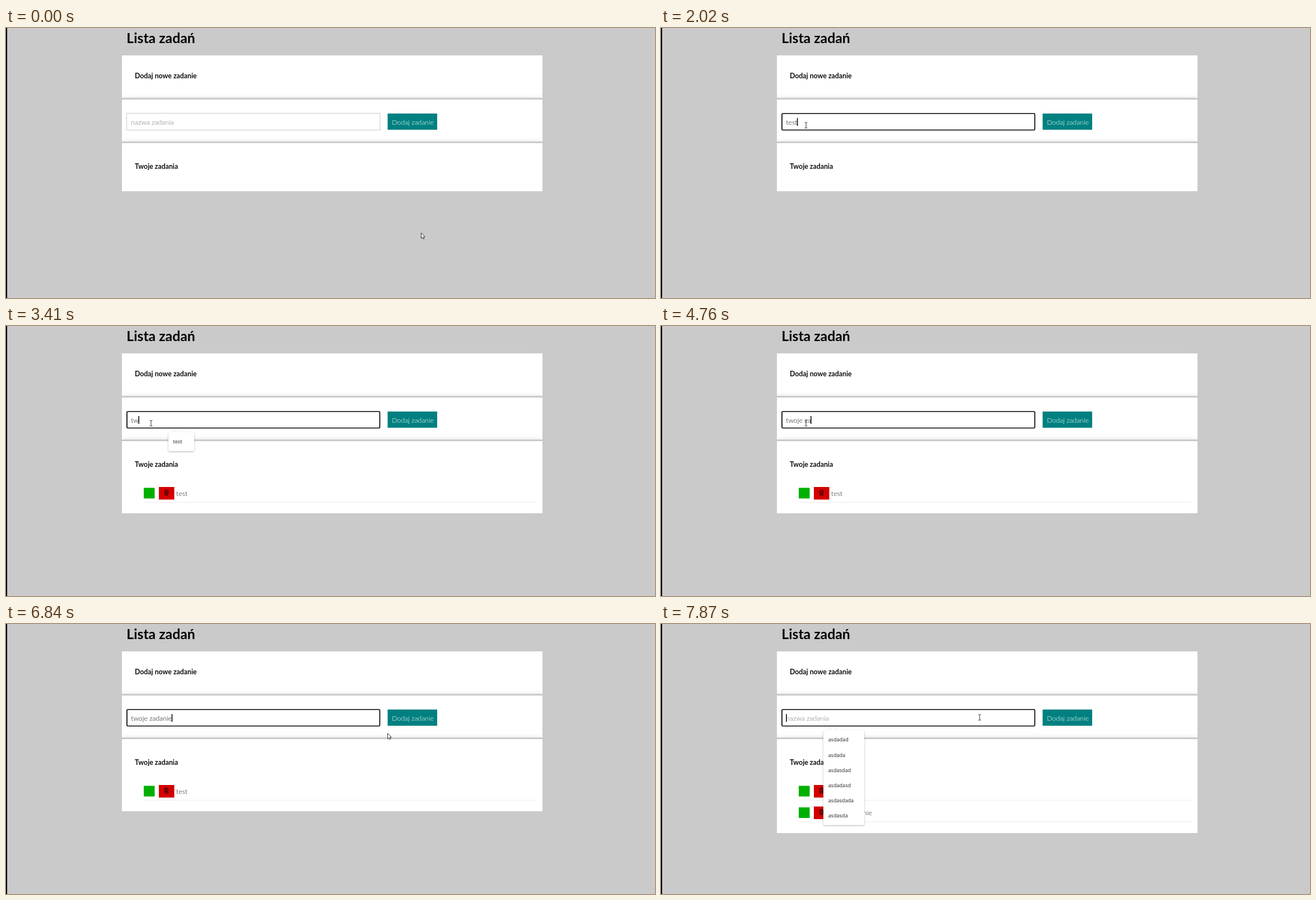
Recreate the animation shown at these times as an HTML page. Size 1159 by 483 pixels, loop 8 s.

```html
<!DOCTYPE html>
<html lang="pl">
<head>
<meta charset="utf-8">
<title>Lista zadań</title>
<style>
  html, body { margin: 0; width: 100%; height: 100%; overflow: hidden; background: #cacaca; }
  svg { position: absolute; inset: 0; width: 1159px; height: 483px; font: 300 12.3px Lato, sans-serif; }
  text { white-space: pre; }
  .bar { position: absolute; left: 0; top: 0; width: 2px; height: 483px; background: #000; }
  .card { position: absolute; left: 206.5px; width: 751.5px; background: #fff; box-shadow: 0 0 11px #cacaca; }
  h1, h2 { margin: 0; }
  .title { font-weight: 700; font-size: 24.8px; }
  .heading { font-weight: 700; fill: #111; }
  .popup { filter: drop-shadow(0 1px 1.5px rgba(0, 0, 0, .3)); }
  .popup text { font: 400 9.1px "Open Sans", "Noto Sans", sans-serif; fill: #222; }
</style>
</head>
<body>
<div class="card" style="top:49px;height:76px"></div>
<div class="card" style="top:128px;height:75px"></div>
<div class="card" id="list" style="top:206px;height:86px"></div>
<div class="bar"></div>
<svg viewBox="0 0 1159 483">
  <text class="title" x="215.3" y="27">Lista zadań</text>
  <text class="heading" x="230" y="89.7">Dodaj nowe zadanie</text>
  <text class="heading" x="230" y="251.7">Twoje zadania</text>

  <rect id="field" fill="#fff"/>
  <text id="entry" x="223.3" y="172.5"></text>
  <rect id="caret" y="161" width="1.5" height="14"/>

  <rect x="681.5" y="153" width="88.5" height="29" fill="#008080"/>
  <text x="689.3" y="172.5" fill="#fff">Dodaj zadanie</text>

  <g id="tasks"></g>

  <g id="popup" class="popup">
    <path d="M301 190.5L307 184.5L313 190.5Z" fill="#fff"/>
    <rect id="panel" x="290" y="190" rx="3" fill="#fff"/>
    <g id="options"></g>
  </g>

  <path id="arrow" d="M.5 .5V10.4L2.8 8.3L4.3 11.7L5.9 11L4.4 7.7H7.3Z" fill="#fff" stroke="#222" stroke-width=".9"/>
  <path id="beam" d="M-2.5 -5H-.8L0 -4.4L.8 -5H2.5M0 -4.4V4.4M-2.5 5H-.8L0 4.4L.8 5H2.5" fill="none" stroke="#333"/>
</svg>
<script>
const LOOP = 8000, TICK = 200 / 3, ROW = 38.5;
const $ = id => document.getElementById(id);
const setAttrs = (el, attrs) => Object.entries(attrs).forEach(([k, v]) => el.setAttribute(k, v));
const show = (el, on) => el.setAttribute('visibility', on ? 'inherit' : 'hidden');

// [time, value]: the last entry reached is the current one.
const typed = [
  [0, ''], [1530, 't'], [1670, 'te'], [1820, 'tes'], [2020, 'test'], [2220, ''],
  [3160, 't'], [3410, 'tw'], [3620, 'two'], [3830, 'twoj'], [3900, 'twoje'], [4030, 'twoje '],
  [4430, 'twoje z'], [4760, 'twoje za'], [5030, 'twoje zad'], [5160, 'twoje zada'],
  [5290, 'twoje zadan'], [5420, 'twoje zadani'], [5620, 'twoje zadanie'], [7130, '']
];
const focus = [[0, false], [700, true], [7060, false], [7600, true]];
const caretOn = [
  [0, false], [700, true], [1200, false], [1530, true], [2560, false], [3080, true],
  [6120, false], [6620, true], [7060, false], [7600, true]
];
const history = ['asdadad', 'asdada', 'asdasdad', 'asdadasd', 'asdasdada', 'asdasda'];
const suggestions = [[0, []], [800, history], [1600, []], [3160, ['test']], [3480, []], [7740, history]];
const tasks = [
  { name: 'test', added: 2220, icon: 2420 },
  { name: 'twoje zadanie', added: 7130, icon: 7330 }
];
const pointer = [
  [0, 741, 366], [67, 741, 366], [134, 755, 354], [267, 680, 335], [400, 470, 262],
  [533, 300, 190], [666, 259, 174], [6066, 259, 174], [6200, 285, 170], [6400, 410, 166],
  [6600, 600, 174], [6733, 668, 190], [6790, 681, 195], [6860, 681, 195], [7060, 715, 172],
  [7200, 715, 172], [7400, 650, 170], [7600, 585, 167], [7730, 573, 167], [7860, 569, 167]
];

const valueAt = (track, t) => track.findLast(([start]) => start <= t)[1];

function pointerAt(t) {
  const next = pointer.findIndex(([start]) => start > t);
  if (next < 0) return pointer.at(-1).slice(1);
  const [t0, x0, y0] = pointer[next - 1], [t1, x1, y1] = pointer[next];
  const k = (t - t0) / (t1 - t0);
  return [x0 + (x1 - x0) * k, y0 + (y1 - y0) * k];
}

$('tasks').innerHTML = tasks.map(({ name }, i) => `
  <g transform="translate(0 ${i * ROW})">
    <rect x="246" y="289.5" width="19.5" height="19" fill="#00b000"/>
    <rect x="273" y="288" width="27.5" height="22.5" fill="#d40000"/>
    <path class="icon" d="M282.5 295H290.5M285 294.5V293.5H288V294.5M283.5 295.5L284 302.5H289L289.5 295.5M285.6 297V301M287.4 297V301"
      fill="none" stroke="#000" stroke-width=".9"/>
    <text x="304" y="303.7" fill="#222">${name}</text>
    <rect x="246" y="314.8" width="702" height="1" fill="#ebebeb"/>
  </g>`).join('');
const rows = [...$('tasks').children];

let currentOptions;
function drawPopup(options) {
  if (options === currentOptions) return;
  currentOptions = options;
  show($('popup'), options.length);
  setAttrs($('panel'), {
    width: options === history ? 73 : 46,
    height: 34 + 27.15 * Math.max(0, options.length - 1)
  });
  $('options').innerHTML = options
    .map((text, i) => `<text x="298.5" y="${210.4 + i * 27.15}">${text}</text>`).join('');
}

function draw(t) {
  const text = valueAt(typed, t), focused = valueAt(focus, t);
  const entry = $('entry'), caret = $('caret');
  entry.textContent = text || 'nazwa zadania';
  entry.setAttribute('fill', text ? '#111' : '#757575');
  caret.setAttribute('x', 223.2 + (text ? entry.getComputedTextLength() - .4 : 0));
  show(caret, valueAt(caretOn, t));

  setAttrs($('field'), focused
    ? { x: 216, y: 153, width: 451.5, height: 29.5, rx: 1.5, stroke: '#000', 'stroke-width': 1.7 }
    : { x: 215.5, y: 152.5, width: 452.5, height: 30, rx: 0, stroke: '#c8c8c8', 'stroke-width': 1 });

  const count = tasks.filter(({ added }) => added <= t).length;
  $('list').style.height = [86, 128.7, 167.5][count] + 'px';
  rows.forEach((row, i) => {
    show(row, i < count);
    show(row.querySelector('.icon'), i < count && t >= tasks[i].icon);
  });
  drawPopup(valueAt(suggestions, t));

  const [x, y] = pointerAt(Math.floor(t / TICK + .01) * TICK);
  const overField = x > 216 && x < 668 && y > 152 && y < 183;
  [$('arrow'), $('beam')].forEach((el, i) => {
    show(el, overField === !!i);
    el.setAttribute('transform', `translate(${x} ${y})`);
  });
}

const start = performance.now();
function frame() {
  draw((performance.now() - start) % LOOP);
  requestAnimationFrame(frame);
}
frame();
</script>
</body>
</html>
```
